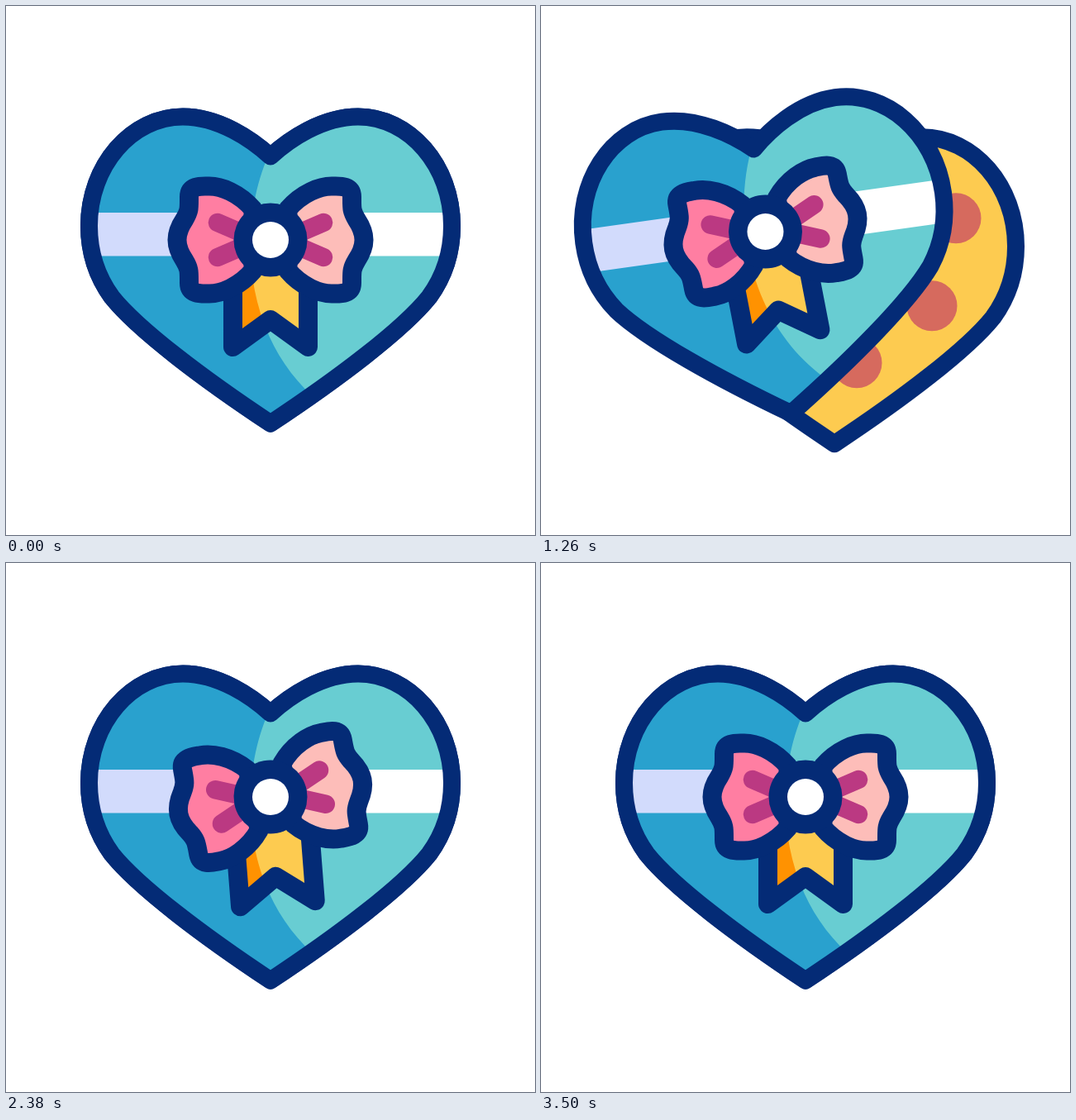
Animation, 640 px wide and 640 px high, one loop 3.6 s. Source, as an HTML page with a canvas:

```html
<!DOCTYPE html>
<html lang="en">
<head>
<meta charset="utf-8">
<title>Heart box</title>
<style>
html, body { margin: 0; width: 100%; height: 100%; overflow: hidden; background: #fff; }
canvas { display: block; width: 100vw; height: 100vh; }
</style>
</head>
<body>
<canvas id="stage" width="640" height="640"></canvas>
<script>
const canvas = document.getElementById('stage');
const ctx = canvas.getContext('2d');
const LOOP = 3600, CLOSE = 1860, CX = 320, CY = 283;
const NAVY = '#042b76', GOLD = '#fdcb50';

// Closed curve from one half of its Bézier points and a mirror rule
function symmetric(half, flip) {
  const path = new Path2D();
  const points = [...half, ...half.slice(0, -1).reverse().map(flip)];
  path.moveTo(...points[0]);
  for (let i = 1; i < points.length; i += 3) {
    path.bezierCurveTo(...points.slice(i, i + 3).flat());
  }
  path.closePath();
  return path;
}

const heart = symmetric([
  [320, 182], [342, 162], [382, 134], [426, 134],
  [488, 134], [539.5, 193], [539.5, 266],
  [539.5, 302], [528, 330], [512, 352],
  [480, 392], [400, 452], [320, 505]
], ([x, y]) => [2 * CX - x, y]);

const loop = symmetric([
  [341, 246], [358, 226], [380, 218], [394, 218],
  [402, 218], [418.5, 216], [418.5, 231],
  [418.5, 245], [418, 248], [424, 258],
  [430, 267], [433, 275], [433, 283]
], ([x, y]) => [x, 2 * CY - y]);

const shade = new Path2D('M320 175 C280 260 284 394 372 473 V640 H0 V0 H320Z');
const tail = new Path2D('M274.5 300 V412.5 L320 379.5 L365.5 412.5 V300Z');
const folds = new Path2D('M384 262 L340 281 M384 304 L340 285');

const ease = x => (1 - Math.cos(Math.PI * Math.min(1, Math.max(0, x)))) / 2;

// Swings between 1 and -1, easing from rest in the first step and back in the last
function wobble(n, steps) {
  const edge = Math.min(n, steps - n);
  return edge < 1 ? ease(edge) : -Math.cos(Math.PI * n);
}

function pose(t) {
  const opening = t < CLOSE;
  const s = opening ? t : t - CLOSE;
  const dir = opening ? -1 : 1;
  return {
    open: opening ? ease(s / 476) : 1 - ease((s - 25) / 476),
    bow: 11 * dir * wobble(s / 250, 6),
    tail: 12 * dir * (opening ? wobble(s / 243, 6) : wobble(s / 219, 7))
  };
}

// Moves the drawing's centre to x, y and turns it around a pivot on its axis
function place(x, y, deg, pivot = CY) {
  ctx.translate(x, y + pivot - CY);
  ctx.rotate(deg * Math.PI / 180);
  ctx.translate(-CX, -pivot);
}

function layer(draw) {
  ctx.save();
  draw();
  ctx.restore();
}

function fill(path, color) {
  ctx.fillStyle = color;
  ctx.fill(path);
}

function stroke(path, color, width) {
  ctx.strokeStyle = color;
  ctx.lineWidth = width;
  ctx.stroke(path);
}

function disc(x, y, r, color) {
  ctx.fillStyle = color;
  ctx.beginPath();
  ctx.arc(x, y, r, 0, Math.PI * 2);
  ctx.fill();
}

function band(color) {
  ctx.fillStyle = color;
  ctx.fillRect(80, 250, 480, 52.5);
}

function drawBox(open) {
  ctx.translate(35 * open, 24.7 * open);
  fill(heart, GOLD);
  disc(467, 232, 30.5, '#d66a5e');
  disc(438, 338, 30.5, '#d66a5e');
  disc(347, 407, 30.5, '#d66a5e');
  stroke(heart, NAVY, 21);
}

function drawLid() {
  layer(() => {
    ctx.clip(heart);
    fill(heart, '#68cdd2');
    band('#fff');
    ctx.clip(shade);
    fill(heart, '#29a1ce');
    band('#d2dbfc');
  });
  stroke(heart, NAVY, 21);
}

function drawLoop(color) {
  fill(loop, color);
  stroke(folds, '#bb3982', 22.5);
  stroke(loop, NAVY, 23);
}

function drawBow() {
  drawLoop('#fdbdb9');
  layer(() => {
    ctx.translate(2 * CX, 0);
    ctx.scale(-1, 1);
    drawLoop('#ff7ea2');
  });
  disc(CX, CY, 44.5, NAVY);
  disc(CX, CY, 22, '#fff');
}

function render(t) {
  const { open, bow, tail: swing } = pose(t);
  const x = CX - 48.5 * open, y = CY - 10 * open, tilt = -8 * open;
  const placeLid = () => place(x, y, tilt);
  const placeTail = () => place(x, y, swing, 298);

  ctx.fillStyle = '#fff';
  ctx.fillRect(0, 0, 640, 640);
  ctx.lineCap = ctx.lineJoin = 'round';

  layer(() => drawBox(open));
  layer(() => { placeLid(); drawLid(); });

  // The shade on the tail stays aligned with the lid
  layer(() => {
    placeTail();
    fill(tail, GOLD);
    ctx.clip(tail);
    ctx.resetTransform();
    placeLid();
    fill(shade, '#ff9201');
  });
  layer(() => { placeTail(); stroke(tail, NAVY, 23); });
  layer(() => { place(x, y, bow); drawBow(); });
}

const start = performance.now();
function tick(now) {
  render(Math.max(0, now - start) % LOOP);
  requestAnimationFrame(tick);
}
render(0);
requestAnimationFrame(tick);
</script>
</body>
</html>
```
